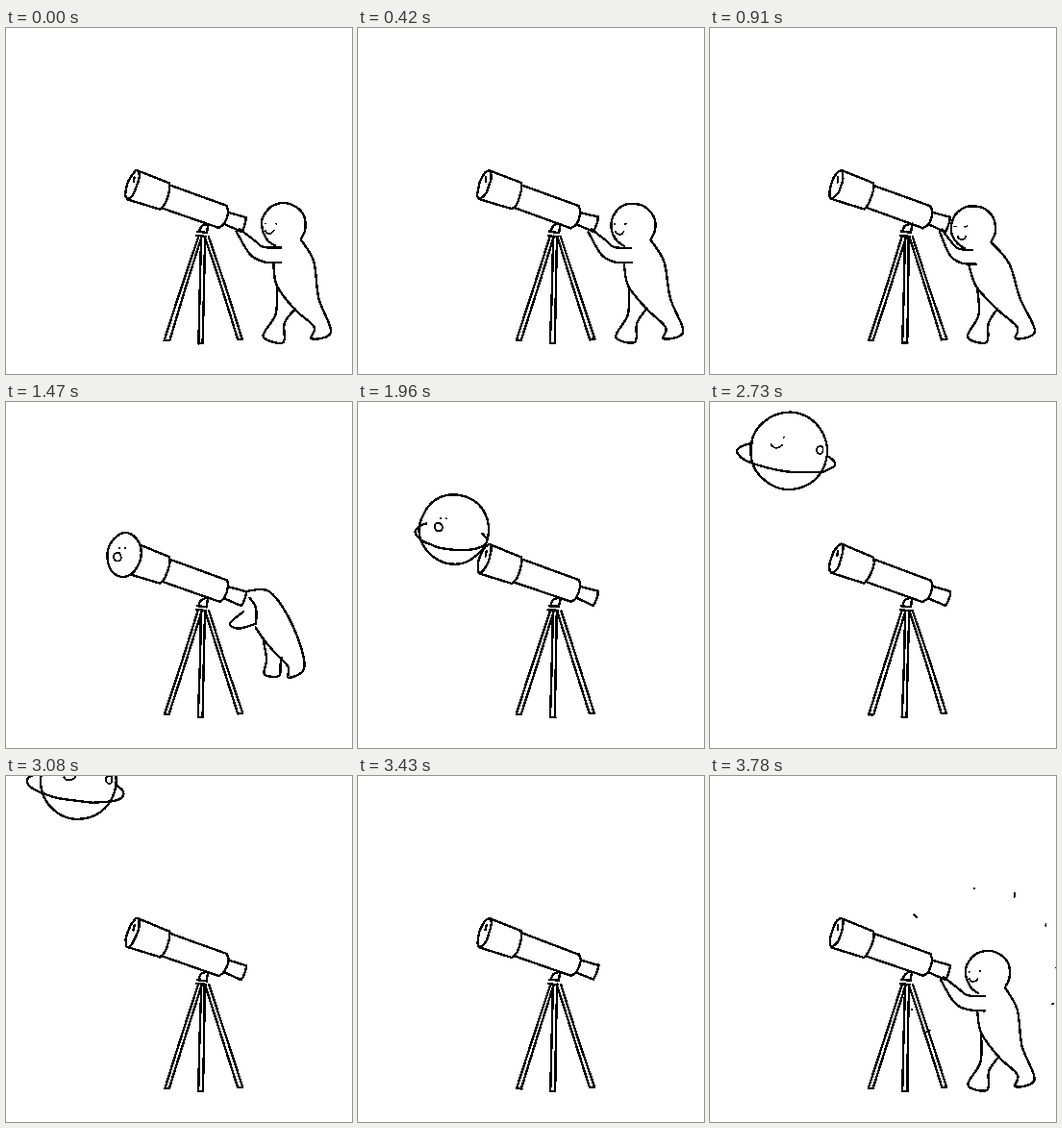
Recreate the animation shown at these times as an HTML page. Size 360x360 px, loop 3850 ms.

```html
<!DOCTYPE html>
<html lang="en">
<head>
<meta charset="utf-8">
<title>Telescope</title>
<style>
  html, body { margin: 0; width: 100%; height: 100%; overflow: hidden; background: #fff; }
  svg { display: block; width: 100vw; height: 100vh; }
  path { fill: none; stroke: #000; stroke-width: 2.4; stroke-linecap: round; stroke-linejoin: round; shape-rendering: crispEdges; }
  #planet { fill: #fff; }
  #detail { stroke-width: 1.8; }
</style>
</head>
<body>
<svg viewBox="0 0 360 360">
  <path id="scope"/>
  <path id="person"/>
  <path id="planet"/>
  <path id="ring"/>
  <path id="detail"/>
</svg>
<script>
const LOOP = 3850, STEP = 70, WOBBLE = 0.45;
const EYEPIECE = [248, 205], BURST = [290, 240], HEAD = [289, 205];
const RAD = Math.PI / 180;

const mix = (a, b, k) => a + (b - a) * k;
const mixPt = (a, b, k) => [mix(a[0], b[0], k), mix(a[1], b[1], k)];
const clamp = v => Math.max(0, Math.min(1, v));
const pts = s => s.split(' ').map(p => p.split(',').map(Number));

// Linear keyframes: rows of [time, ...values]
function track(t, keys) {
  const n = keys.findIndex(k => k[0] > t);
  if (n === 0) return keys[0].slice(1);
  if (n < 0) return keys[keys.length - 1].slice(1);
  const a = keys[n - 1], b = keys[n], k = (t - a[0]) / (b[0] - a[0]);
  return a.slice(1).map((v, i) => mix(v, b[i + 1], k));
}

let seed = 1;
function wobble() {
  seed = (seed * 16807) % 2147483647;
  return (seed / 2147483647 - 0.5) * 2 * WOBBLE;
}

// Smooth hand-drawn line through the points
function line(list, closed = false) {
  const p = list.map(([x, y]) => [x + wobble(), y + wobble()]);
  const n = p.length;
  const at = i => closed ? p[(i + n) % n] : p[Math.max(0, Math.min(n - 1, i))];
  const f = v => v.toFixed(1);
  let d = `M${f(p[0][0])} ${f(p[0][1])}`;
  for (let i = 0; i < (closed ? n : n - 1); i++) {
    const [a, b, c, e] = [at(i - 1), at(i), at(i + 1), at(i + 2)];
    d += 'C' + [b[0] + (c[0] - a[0]) / 6, b[1] + (c[1] - a[1]) / 6,
                c[0] - (e[0] - b[0]) / 6, c[1] - (e[1] - b[1]) / 6, c[0], c[1]].map(f).join(' ');
  }
  return d + (closed ? 'Z' : '');
}

// Elliptic arc in degrees; a full turn is closed
function arc([x, y], rx, ry, from = 0, to = 360, tilt = 0, n = 14) {
  const c = Math.cos(tilt * RAD), s = Math.sin(tilt * RAD), full = to - from === 360;
  const list = Array.from({ length: full ? n : n + 1 }, (_, i) => {
    const a = mix(from, to, i / n) * RAD, u = Math.cos(a) * rx, v = Math.sin(a) * ry;
    return [x + u * c - v * s, y + u * s + v * c];
  });
  return line(list, full);
}

const dash = (x, y, w = 0.5) => line([[x - w / 2, y], [x + w / 2, y]]);

// Telescope: sections along a tilted axis as [start, end, radius, end radius, bulge]
const FRONT = [131.5, 163], TILT = 19.7;
const sections = [[0, 35.5, 16, 14.5, 3], [37, 100, 12.5, 12, 4], [104, 123, 6.5, 8, 1]];
const legs = [[202, 167.5, 325], [205, 202.5, 328], [209, 243.5, 324]];

function onAxis(u, v) {
  const c = Math.cos(TILT * RAD), s = Math.sin(TILT * RAD);
  return [FRONT[0] + u * c - v * s, FRONT[1] + u * s + v * c];
}

function drawScope() {
  let d = arc(FRONT, 5, 15.5, 0, 360, TILT) + line([onAxis(-1, -8), onAxis(0, -3)]);
  for (const [a, b, r, q, bulge] of sections) {
    const cap = [[b, -q], [b + bulge, -q / 2], [b + bulge, q / 2], [b, q]];
    d += line([onAxis(a, -r), onAxis(b, -q)]) + line([onAxis(a, r), onAxis(b, q)]);
    d += line(cap.map(p => onAxis(...p)));
  }
  d += arc([209, 211], 8, 7, 180, 280, 0, 4) + line(pts('210,206 209,212'));
  d += line(pts('199,212 209,213')) + line(pts('198,216 208,217'));
  for (const [top, foot, y] of legs) {
    for (const side of [-1, 1]) {
      d += line([0, 0.5, 1].map(k => [mix(top + 2 * side, foot + 2.5 * side, k), mix(217, y, k)]));
    }
    d += line([[foot - 2.5, y], [foot + 2.5, y]]);
  }
  return d;
}

// Person: back with far leg, near leg, upper and lower arm line
const standing = [
  '307,220 320,243 325,281 338,316 318,323 320,311 300,292 282,268 278,245',
  '282,270 281,298 268,321 288,327 290,307 301,292',
  '243,209 259,221 268,228 286,229',
  '240,212 254,235 268,243 286,244'
].map(pts);
const pulled = [
  '251,197 275,198 298,232 311,275 294,287 293,275 279,260 266,245 260,235',
  '267,246 271,268 269,283 284,285 285,274 287,266',
  '260,231 261,222 259,212 254,204',
  '247,218 233,230 242,236 260,231'
].map(pts);

// Bends towards the eyepiece: feet and hand stay, the head moves most
function lean([x, y], k) {
  const high = clamp((325 - y) / 105), far = clamp((x - 238) / 40);
  const s = 15 * k * high * high * far;
  return [x - s, y + s * 0.2];
}

function drawPerson(t) {
  if (t >= 1750 && t < 3570) return ['', ''];
  const k = t >= 3570 ? 0 : track(t, [[350, 0], [770, 1], [1120, 1], [1470, 2], [1750, 3]])[0];
  const bend = clamp(k), pull = clamp(k - 1), gone = clamp(k - 2);
  let d = standing.map((part, j) => line(part.map((p, i) =>
    mixPt(mixPt(lean(p, bend), pulled[j][i], pull), EYEPIECE, gone)))).join('');

  const size = 1 - pull, [x, y] = mixPt(lean(HEAD, bend), EYEPIECE, pull);
  if (size > 0) d += arc([x, y], 23 * size, 23 * size, 115, 395);
  const face = size < 0.6 ? '' :
    dash(x - 19, y - 1.5, 3 * bend) + dash(x - 8, y - 1.5, 3 * bend) +
    arc([x - 15 + 3 * bend, y + 5 + 3 * bend], 4.5, 4, 10, 170, 0, 4);
  return [d, face];
}

function drawPlanet(t) {
  if (t < 1260 || t >= 3430) return ['', '', ''];
  const [x, y, rx, ry, tilt] = track(t, [
    [1190, 131, 163, 2, 3, 12], [1470, 123, 159, 17.5, 23, 9], [1680, 108, 150, 32, 32, 0],
    [2240, 92, 115, 40, 40, 0], [3430, 68, -41, 39, 40, 0]]);
  let ring = '', detail = '';
  if (t >= 1330) {
    const s = Math.min(1, rx / 17.5);
    const [mx, my] = track(t, [[1470, -7, 2], [2380, -24, -6], [2730, -13, -5], [3430, -5, 0]]);
    const fx = x + mx * s, fy = y + my * s;
    detail += t < 2550 ? arc([fx, fy], 4 * s, 4.5 * s, 0, 360, 0, 7) : arc([fx, fy - 2], 6, 4, 10, 170, 0, 4);
    detail += dash(fx + 8 * s, fy - 9 * s);
    if (t < 2000) detail += dash(fx + 2 * s, fy - 9 * s);
  }
  if (t >= 1960) {
    const grow = track(t, [[1960, 0.8], [2170, 1]])[0] * rx / 40;
    ring = arc([x - 3, y + 7], 52 * grow, 14, -32, 223, 8, 18);
  }
  if (t >= 2310) {
    const [cx, cy, w, h] = track(t, [[2380, 37, -15, 1, 3], [2730, 32, -1, 3.5, 4]]);
    detail += arc([x + cx, y + cy], w, h, 0, 360, 0, 7);
  }
  return [arc([x, y], rx, ry, 0, 360, tilt), ring, detail];
}

// Burst around the person, reaching highest above the head
function drawSparks(t) {
  if (t < 3570) return '';
  const k = track(t, [[3500, 0.35], [3780, 1]])[0];
  return [-202, -182, -129, -97, -77, -55, -30, -2].map((deg, i) => {
    const c = Math.cos(deg * RAD), s = Math.sin(deg * RAD);
    const r = (66 + 58 * Math.max(0, Math.cos((deg + 105) * RAD))) * k, len = i % 2 ? 1 : 4;
    return line([r, r + len].map(q => [BURST[0] + q * c, BURST[1] + q * s]));
  }).join('');
}

const set = (id, d) => document.getElementById(id).setAttribute('d', d);
const start = performance.now();
let last = -1;

function tick() {
  const step = Math.floor((performance.now() - start) % LOOP / STEP);
  if (step !== last) {
    last = step;
    const t = step * STEP;
    seed = 7919 * (step + 1);
    const [person, face] = drawPerson(t), [planet, ring, detail] = drawPlanet(t);
    set('scope', drawScope());
    set('person', person);
    set('planet', planet);
    set('ring', ring);
    set('detail', face + detail + drawSparks(t));
  }
  requestAnimationFrame(tick);
}
tick();
</script>
</body>
</html>
```
